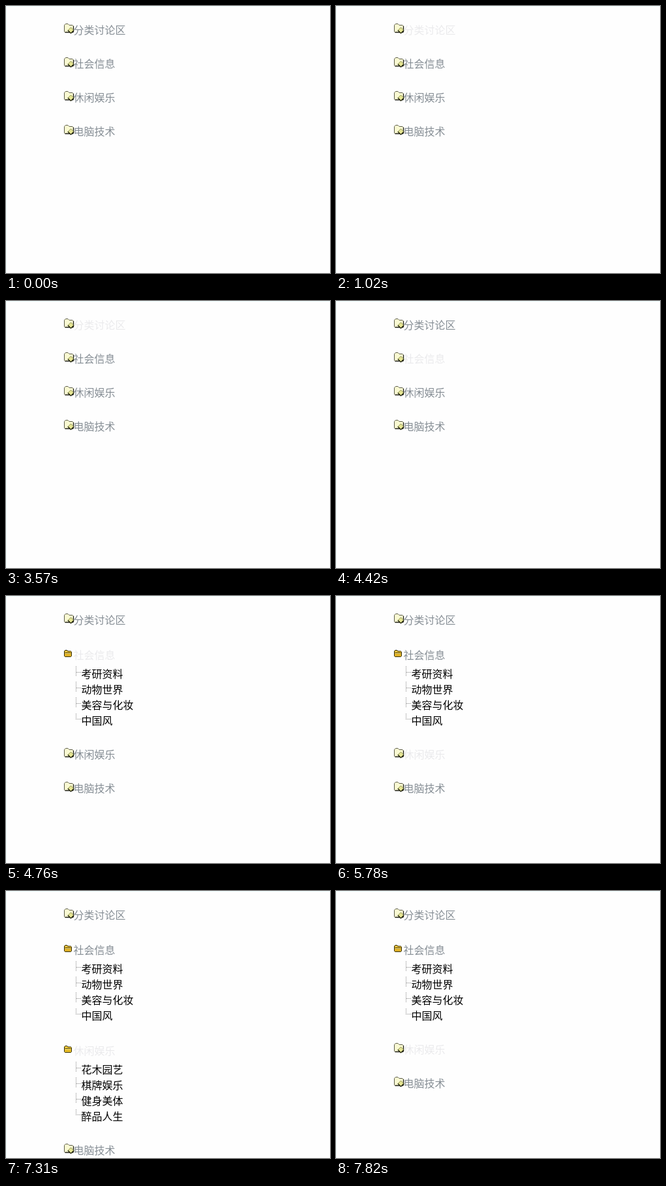
Animation of 497 by 411 pixels, one loop 7990 ms. Source, as an HTML page:

```html
<!DOCTYPE html>
<html lang="zh-CN">
<head>
<meta charset="utf-8">
<title>Folder tree</title>
<style>
  html, body { margin: 0; width: 100%; height: 100%; overflow: hidden; background: #fefefe; }
  svg { display: block; width: 497px; height: 411px; }
  text { font: 300 16px "Noto Sans CJK SC", "Noto Sans CJK", "Noto Sans CJK JP", sans-serif; fill: #000; }
  .latin { font: 400 14px "Liberation Serif", serif; letter-spacing: -.8px; }
  .head { fill: #858d94; }
  .hover { fill: #eaeaec; }
  .edge { fill: none; stroke: #effefe; }
  .twig { fill: none; stroke: #8c8c8c; stroke-dasharray: 1 1; shape-rendering: crispEdges; }
</style>
</head>
<body>
<svg viewBox="0 0 497 411">
  <defs>
    <g id="closed">
      <path d="M.5 12.5V2.5L2.5.5H6L8 2.5H13L14.5 4V12.5L13.5 13.5H1.5Z" fill="#fafad2" stroke="#5c5c48"/>
      <path d="M14.5 4V12.5L13.5 13.5H1.5" fill="none" stroke="#1c1c14" stroke-width="1.3"/>
      <path d="M10.5 6L15 10.5L10.5 15L6 10.5Z" fill="#e6e694" stroke="#767a3c" stroke-width=".8"/>
      <path d="M15 10.5L10.5 15L6 10.5" fill="none" stroke="#22240f" stroke-width="1.2"/>
    </g>
    <g id="opened">
      <path d="M.5 9.5V2L1.8.5H4.8L6 2H10.4L11.5 3V9.5L10.4 10.5H1.5Z" stroke="#33300f"/>
      <path d="M1.5 4.5H10.5" stroke="#4c4718" stroke-width=".9"/>
      <path d="M2 2.4H4.8M2 5.5H10" stroke="#f6e78c" stroke-width=".8"/>
    </g>
  </defs>
  <path class="edge" d="M.5 411V.5H497"/>
  <g id="tree"></g>
</svg>
<script>
const LOOP = 7990;
const TOP = 37, CLOSED_STEP = 52, OPEN_STEP = 155, KID_STEP = 24;

const sections = [
  { name: "分类讨论区", color: "#c4ba70", kids: ["BBS系统", "新手园地", "站务公告栏", "申请版主"] },
  { name: "社会信息", color: "#dfb026", kids: ["考研资料", "动物世界", "美容与化妆", "中国风"] },
  { name: "休闲娱乐", color: "#e6bc28", kids: ["花木园艺", "棋牌娱乐", "健身美体", "醉品人生"] },
  { name: "电脑技术", color: "#dfb026", kids: [] }
];

// [start ms, open sections, hovered section or -1]
const steps = [
  [0, [], -1],
  [510, [], 3],
  [680, [], -1],
  [1020, [], 0],
  [2210, [0], 0],
  [3570, [], 0],
  [3910, [], -1],
  [4420, [], 1],
  [4760, [1], 1],
  [5100, [1], -1],
  [5780, [1], 2],
  [5950, [1, 2], 2],
  [6290, [1, 2], -1],
  [7310, [1, 2], 2],
  [7820, [1], 2]
];

function add(parent, tag, attrs, content = "") {
  const node = document.createElementNS("http://www.w3.org/2000/svg", tag);
  for (const key in attrs) node.setAttribute(key, attrs[key]);
  node.textContent = content;
  return parent.appendChild(node);
}

function addLabel(parent, x, y, label) {
  const latin = label.match(/^[A-Z]*/)[0];
  if (latin) add(parent, "text", { x, y: y - 1, class: "latin" }, latin);
  add(parent, "text", { x: x + latin.length * 8, y }, label.slice(latin.length));
}

// Dots sit on a checkerboard, so the last corner is shifted by one.
function addTwig(parent, y, last) {
  const shift = last ? 1 : 0;
  const stem = last ? 9 : 16;
  const d = `M107.5 ${y - 12 + shift}v${stem}M${108 + shift} ${y - 2.5}h8`;
  add(parent, "path", { class: "twig", d });
}

const tree = document.getElementById("tree");
for (const s of sections) {
  s.group = add(tree, "g", {});
  s.closedIcon = add(s.group, "use", { href: "#closed", x: 89, y: -10 });
  s.openIcon = add(s.group, "use", { href: "#opened", x: 89, y: -6, fill: s.color });
  s.head = add(s.group, "text", { x: 103.5, class: "head" }, s.name);
  s.list = add(s.group, "g", {});
  s.kids.forEach((kid, i) => {
    const y = 31 + i * KID_STEP;
    addTwig(s.list, y, i === s.kids.length - 1);
    addLabel(s.list, 115.5, y + 6, kid);
  });
}

function show(node, on) {
  node.setAttribute("visibility", on ? "visible" : "hidden");
}

function render([, open, hover]) {
  let y = TOP;
  sections.forEach((s, i) => {
    const isOpen = open.includes(i);
    s.group.setAttribute("transform", `translate(0 ${y})`);
    s.head.setAttribute("y", isOpen ? 8 : 6);
    s.head.classList.toggle("hover", i === hover);
    show(s.closedIcon, !isOpen);
    show(s.openIcon, isOpen);
    show(s.list, isOpen);
    y += isOpen ? OPEN_STEP : CLOSED_STEP;
  });
}

const start = performance.now();
let current = null;
function tick() {
  const t = (performance.now() - start) % LOOP;
  const step = steps.findLast(([at]) => at <= t);
  if (step !== current) render(current = step);
  requestAnimationFrame(tick);
}
tick();
</script>
</body>
</html>
```
